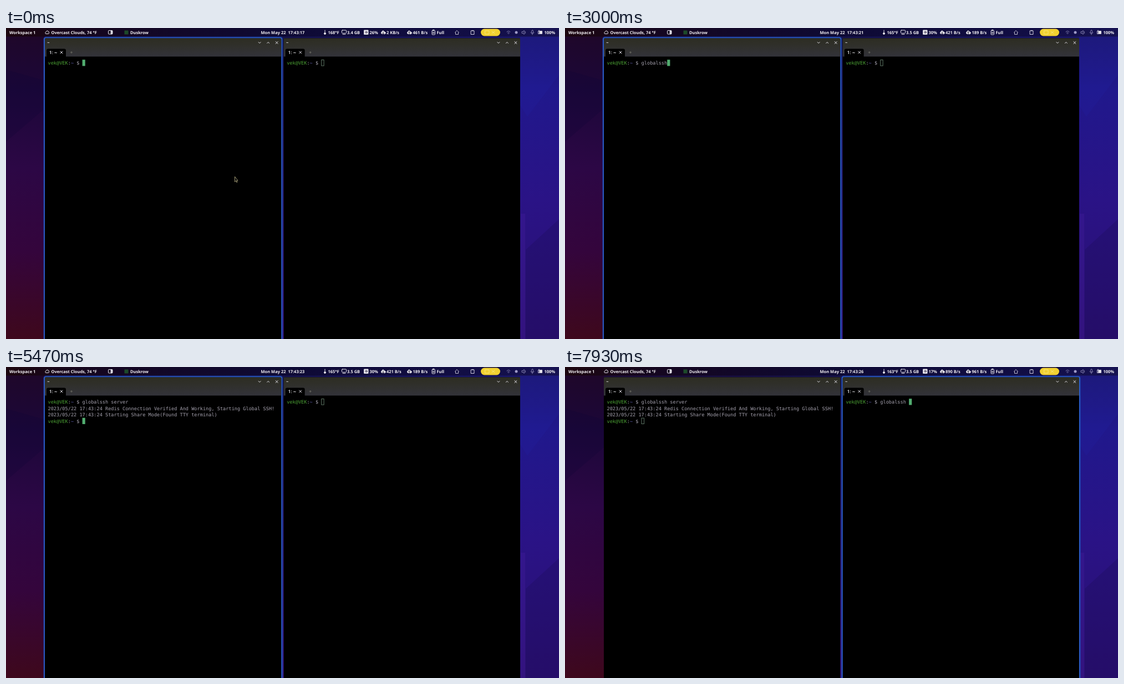
These frames come from a looping animation (997x561 px, 8 s). An HTML page:

```html
<!DOCTYPE html>
<html lang="en">
<head>
<meta charset="utf-8">
<title>Shared terminal session</title>
<style>
  html, body { margin: 0; width: 100%; height: 100%; overflow: hidden; background: #000; }
  svg { display: block; width: 997px; height: 561px; }
  text { white-space: pre; text-rendering: geometricPrecision; }
  .ui { font: 700 7.5px "Noto Sans", sans-serif; fill: #f0eef2; }
  .tab { font: 700 8.2px Roboto, sans-serif; fill: #d8d8dc; }
  .term { font: 8.6px "DejaVu Sans Mono", monospace; fill: #a5a1ae; }
  .user { fill: #4ba034; }
  .path { fill: #5f5fae; }
  .icon { fill: none; stroke: #e6e4ec; stroke-width: 1; stroke-linecap: round; stroke-linejoin: round; }
  .solid { fill: #e6e4ec; }
</style>
</head>
<body>
<svg id="stage" viewBox="0 0 997 561">
  <defs>
    <linearGradient id="leftWall" x1="0" y1="0" x2="0" y2="1">
      <stop offset="0" stop-color="#1f0728"/>
      <stop offset=".2" stop-color="#1c0739"/>
      <stop offset=".45" stop-color="#2c0745"/>
      <stop offset=".72" stop-color="#34053c"/>
      <stop offset="1" stop-color="#3e081c"/>
    </linearGradient>
    <linearGradient id="rightWall" x1="0" y1="0" x2="0" y2="1">
      <stop offset="0" stop-color="#1b176c"/>
      <stop offset=".2" stop-color="#20188c"/>
      <stop offset=".55" stop-color="#2a1386"/>
      <stop offset="1" stop-color="#2a0f70"/>
    </linearGradient>
    <linearGradient id="gapWall" x1="0" y1="0" x2="0" y2="1">
      <stop offset="0" stop-color="#16164c"/>
      <stop offset=".5" stop-color="#281a6c"/>
      <stop offset="1" stop-color="#3a1884"/>
    </linearGradient>
    <linearGradient id="topWall">
      <stop offset="0" stop-color="#1c0a34"/>
      <stop offset=".5" stop-color="#15124c"/>
      <stop offset="1" stop-color="#1b1870"/>
    </linearGradient>
    <linearGradient id="topBar">
      <stop offset="0" stop-color="#1c060f"/>
      <stop offset=".15" stop-color="#15061f"/>
      <stop offset=".5" stop-color="#0e0a34"/>
      <stop offset=".8" stop-color="#110d42"/>
      <stop offset="1" stop-color="#161252"/>
    </linearGradient>
    <linearGradient id="titleBar" x1="0" y1="0" x2="0" y2="1">
      <stop offset="0" stop-color="#2d2d22"/>
      <stop offset=".45" stop-color="#30302c"/>
      <stop offset="1" stop-color="#33333a"/>
    </linearGradient>
  </defs>

  <rect width="997" height="561" fill="url(#topWall)"/>
  <rect width="70" height="561" fill="url(#leftWall)"/>
  <path d="M0 75 70 95V145L0 205Z" fill="#0e0734" opacity=".25"/>
  <rect x="496" y="18" width="6" height="543" fill="url(#gapWall)"/>
  <rect x="927" width="70" height="561" fill="url(#rightWall)"/>
  <path d="M927 15H997V85L940 160 927 140Z" fill="#2020a0" opacity=".25"/>
  <path d="M937 400 997 345V561H937Z" fill="#1c0a58" opacity=".3"/>
  <path d="M928 335h8V561h-8Z" fill="#4a20a0" opacity=".3"/>
  <rect width="997" height="15.5" fill="url(#topBar)"/>

  <g class="ui">
    <text x="6" y="10.5">Workspace 1</text>
    <text x="81.5" y="10.5">Overcast Clouds, 74 °F</text>
    <text x="224" y="10.5">Duskrow</text>
    <text id="clock" x="459.5" y="10.5"></text>
    <text id="heat" x="580.5" y="10.5"></text>
    <text id="memory" x="615" y="10.5"></text>
    <text id="load" x="655.5" y="10.5"></text>
    <text id="down" x="686" y="10.5"></text>
    <text id="up" x="733.5" y="10.5"></text>
    <text x="776.5" y="10.5">Full</text>
    <text x="970.5" y="10.5">100%</text>
  </g>

  <rect x="213.5" y="4.5" width="7" height="7" fill="#1d4a2a"/>
  <rect x="856" y="1.5" width="35" height="13" rx="6.5" fill="#f2d130"/>
  <g class="icon">
    <path d="M71.5 10.5q-2-2 .5-3.5 1.5-3.5 4.5-1 2 2 .5 4.5M72.5 10.5H76"/>
    <rect x="184.5" y="4.5" width="7.5" height="6.5" rx="1"/>
    <path class="solid" d="M189.500 5h2v5.500h-2z"/>
    <path d="M575 4V9"/><circle class="solid" cx="575" cy="10" r="1.5"/>
    <rect x="605.5" y="4" width="8" height="5.5" rx="1"/><path d="M607 11.500h5"/>
    <rect class="solid" x="646" y="4" width="7" height="7.5"/>
    <circle cx="649.5" cy="7.7" r="1.5" stroke="#211a38"/>
    <rect x="768" y="4.5" width="5.5" height="7.5" rx=".8"/><path d="M769.500 3.500h2.500M769.500 7.500h2.500M769.500 9.500h2.500"/>
    <path d="M809.500 8 813 4.500 816.500 8M810.500 8v3.500h5V8" stroke-width=".8"/>
    <path d="M838.500 5h5.500v6.500h-5.500zM840 4.500h2.500" stroke-width=".9"/>
    <path d="M864 5h7v6h-7zM876 6l5 4M881 6l-5 4" stroke="#f8e88c" stroke-width=".8"/>
    <g stroke="#9f9bc8" stroke-width=".8">
      <path d="M903 7q3-3 6 0M904.500 9q1.500-1.500 3 0M906 10.500v.2"/>
      <path d="M930.500 6.500h1.500l2-2v7l-2-2h-1.500zM936 6q1.500 2 0 4"/>
      <rect x="947.5" y="4" width="3" height="5" rx="1.5"/><path d="M946 8q3 5 6 0M949 10.500v1.500"/>
    </g>
    <path d="M960 5.500h6.500v5H960zM961 4v1" stroke-width=".9"/><path class="solid" d="M962 6.500h4v3h-4z"/>
  </g>
  <circle cx="920" cy="8" r="2.5" fill="#9f9bc8"/>
  <g class="icon" id="clouds"></g>
  <g id="windows"></g>
  <path id="pointer" d="M412.500 268V277.500L414.600 275.600 415.900 278.500 417 278 415.700 275.200H418Z" fill="#08080a" stroke="#b9b184" stroke-width=".8"/>
</svg>

<script>
const LOOP = 8000;
const CELL = 5.177;
const ROW = 11.5;
const PROMPT = '<tspan class="user">vek@VEK</tspan>:<tspan class="path">~</tspan> $ ';
const PROMPT_LENGTH = 12;
const COMMAND = 'globalssh server';
const LOG = [
  '2023/05/22 17:43:24 Redis Connection Verified And Working, Starting Global SSH!',
  '2023/05/22 17:43:24 Starting Share Mode(Found TTY terminal)'
];

// Key press times, one per character.
const LEFT_KEYS = [1000, 1200, 1470, 1730, 1930, 2130, 2400, 2600, 2800, 3530, 3800, 4070, 4270, 4470, 4600, 4800];
const RIGHT_KEYS = [5800, 6000, 6270, 6470, 6670, 6870, 7130, 7330, 7530, 7730];
const ENTER = 5000, OUTPUT = 5470, FOCUS = 5600;

const STATS = [
  { from: 0, heat: '168°F', memory: '3.4 GB', load: '26%', down: '2 KB/s', up: '461 B/s' },
  { from: 930, heat: '165°F', memory: '3.5 GB', load: '30%', down: '421 B/s', up: '189 B/s' },
  { from: 6930, heat: '163°F', memory: '3.5 GB', load: '17%', down: '890 B/s', up: '961 B/s' }
];

const byId = id => document.getElementById(id);
const setText = (node, value) => { if (node.textContent !== value) node.textContent = value; };
const setMarkup = (node, value) => {
  if (node.markup !== value) node.innerHTML = node.markup = value;
};
const typed = (keys, t) => COMMAND.slice(0, keys.filter(k => k <= t).length);

function cloud(x, arrow) {
  return `<path class="solid" d="M${x - 2.5} 10.500q-2.500-1.500 0-3.500 2-4 5 0 3.500 1 1 3.500z"/>
    <path d="M${x} 7v4M${x - 1.5} ${9 + arrow}l1.500 ${arrow * 1.5} 1.500 ${-arrow * 1.5}" stroke="#15102e" stroke-width=".9"/>`;
}
byId('clouds').innerHTML = cloud(680, 1) + cloud(727, -1);

// Builds one terminal window whose inner area starts at x.
function makeWindow(x) {
  const group = document.createElementNS('http://www.w3.org/2000/svg', 'g');
  group.setAttribute('transform', `translate(${x} 0)`);
  group.innerHTML = `
    <g class="focus" fill="none">
      <rect x="-1" y="17" width="428.5" height="560" rx="3" stroke="#1b3d9c" stroke-width="3.5" opacity=".6"/>
      <rect x="-.7" y="17.7" width="427.7" height="560" rx="2.5" stroke="#2f68dc" stroke-width="1.6"/>
    </g>
    <path d="M0 561V20q0-1.500 1.500-1.500H424.800q1.500 0 1.500 1.500V561Z" fill="#000"/>
    <path d="M0 51.500V20q0-1.500 1.500-1.500H424.800q1.500 0 1.500 1.500V51.500Z" fill="url(#titleBar)"/>
    <text class="ui title" x="4.2" y="28.5"></text>
    <g class="icon" stroke-width="1.3">
      <path d="M385.200 25.500l2 2 2-2M400.700 27.500l2-2 2 2M416.200 24.500l4 4M420.200 24.500l-4 4"/>
    </g>
    <path class="tabShape"/>
    <text class="tab label" x="8" y="47"></text>
    <path class="icon close" d="M-2-2 2 2M2-2-2 2"/>
    <path class="plus" d="M-2 0H2M0-2V2" stroke="#74746a" stroke-width=".8"/>
    <g class="term lines"></g>
    <rect class="cursor"/>`;
  byId('windows').append(group);
  const find = name => group.querySelector('.' + name);

  return ({ title, lines, column, focused }) => {
    const tabEnd = title === '~' ? 38 : 68.5;
    find('focus').style.display = focused ? '' : 'none';
    setText(find('title'), title);
    setText(find('label'), '1: ' + title);
    find('tabShape').setAttribute('d', `M3 52V40.500q0-3 3-3H${tabEnd - 3}q3 0 3 3V52Z`);
    find('close').setAttribute('transform', `translate(${tabEnd - 8} 44)`);
    find('plus').setAttribute('transform', `translate(${tabEnd + 10} 44)`);
    setMarkup(find('lines'), lines.map((line, i) =>
      `<text x="5.5" y="${66 + i * ROW}">${line}</text>`).join(''));

    const inset = focused ? 0 : 0.4;
    const box = {
      x: 5.5 + column * CELL + inset,
      y: 57.2 + (lines.length - 1) * ROW + inset,
      width: CELL - 2 * inset,
      height: 11.3 - 2 * inset,
      fill: focused ? '#52ad70' : 'none',
      stroke: focused ? 'none' : '#73907c',
      'stroke-width': 0.8
    };
    for (const key in box) find('cursor').setAttribute(key, box[key]);
  };
}

const drawLeft = makeWindow(70);
const drawRight = makeWindow(500.7);

function draw(t) {
  const second = t < 70 ? 17 : 18 + Math.floor((t + 100) / 1000);
  setText(byId('clock'), `Mon May 22  17:43:${second}`);
  const { from, ...stats } = STATS.findLast(s => s.from <= t);
  for (const id in stats) setText(byId(id), stats[id]);
  byId('pointer').style.display = t < LEFT_KEYS[0] ? '' : 'none';

  const running = t >= ENTER && t < OUTPUT;
  const done = t >= OUTPUT;
  const leftInput = typed(LEFT_KEYS, t);
  const lines = [PROMPT + leftInput];
  if (running) lines.push('');
  if (done) lines.push(...LOG, PROMPT);
  drawLeft({
    title: running ? 'globalssh' : '~',
    lines,
    column: running ? 0 : PROMPT_LENGTH + (done ? 0 : leftInput.length),
    focused: t < FOCUS
  });

  const rightInput = typed(RIGHT_KEYS, t);
  drawRight({
    title: '~',
    lines: [PROMPT + rightInput],
    column: PROMPT_LENGTH + rightInput.length,
    focused: t >= FOCUS
  });
}

const start = performance.now();
function tick() {
  draw((performance.now() - start) % LOOP);
  requestAnimationFrame(tick);
}
tick();
</script>
</body>
</html>
```
